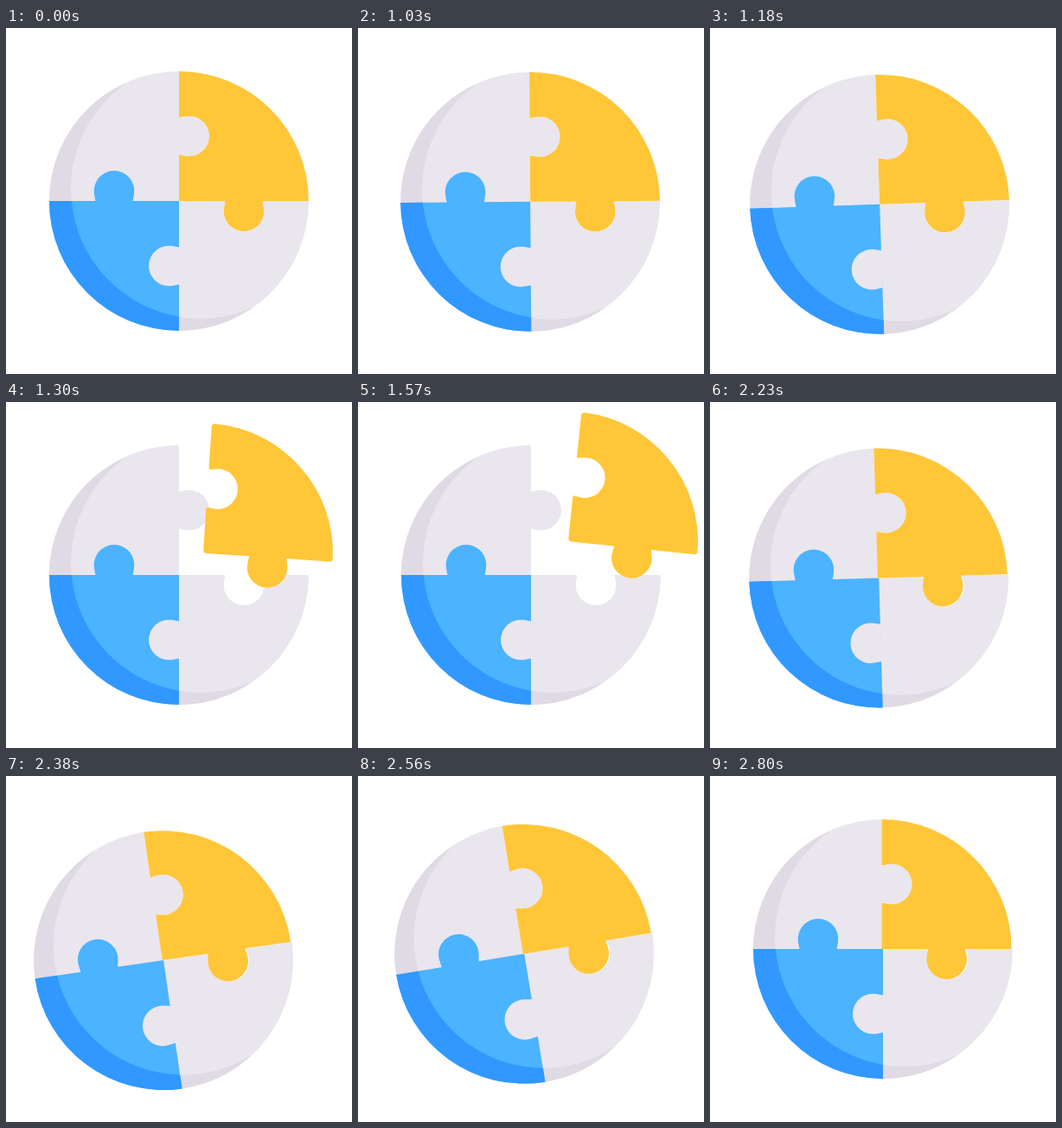
Recreate the animation shown at these times as an HTML page. Size 400 by 400 pixels, loop 2830 ms.

```html
<!DOCTYPE html>
<html lang="en">
<head>
<meta charset="utf-8">
<title>Puzzle circle</title>
<style>
  html, body { margin: 0; width: 100%; height: 100%; overflow: hidden; background: #fff; }
  svg { display: block; width: 100vw; height: 100vh; }
  .light { fill: #eae6ed; }
  .shade { fill: #e0dae4; }
  .blue { fill: #4bb3ff; }
  .deep { fill: #3098ff; }
  .gold { fill: #ffc638; }
  .hole { fill: #fff; }
</style>
</head>
<body>
<svg viewBox="0 0 400 400">
  <defs>
    <!-- Tab on the vertical seam, pointing right; rotated for the other seams -->
    <path id="tab" d="M199.5 103.4H200L207.7 102.05A23.3 23.3 0 1 1 207.7 147.95L200 146.6H199.5Z"/>
  </defs>
  <g id="disc">
    <path id="body" class="light"/>
    <path class="shade" d="M139.7 63A150 150 0 0 0 50 200H75.7A150 150 0 0 1 139.7 63Z"/>
    <path class="shade" d="M200 350A150 150 0 0 0 285.4 323A150 150 0 0 1 200 333.9Z"/>
    <use href="#tab" class="light"/>
    <use href="#tab" class="hole" transform="rotate(90 200 200)"/>
    <path class="blue" d="M200 200V350A150 150 0 0 1 50 200Z"/>
    <path class="deep" d="M50 200A150 150 0 0 0 200 350V333.9A150 150 0 0 1 75.7 200Z"/>
    <use href="#tab" class="blue" transform="rotate(270 200 200)"/>
    <use href="#tab" class="light" transform="rotate(180 200 200)"/>
    <path id="piece" class="gold"/>
  </g>
</svg>
<script>
const LOOP = 2830, START = 1030, STEP = 30;
const RELEASE = 1195, PEAK = 1570, IMPACT = 2203;
const disc = document.getElementById('disc');
const body = document.getElementById('body');
const piece = document.getElementById('piece');

// r rounds the outer corners; the lips of the socket get half of it
function piecePath(r) {
  const l = r / 2;
  return `M${200 + r} 200Q200 200 200 ${200 - r}V${146.6 + l}
    Q200 146.6 ${200 + l} ${146.6 + l * 0.175}L207.7 147.95
    A23.3 23.3 0 1 0 207.7 102.05L${200 + l} ${103.4 - l * 0.175}
    Q200 103.4 200 ${103.4 - l}V${50 + r}Q200 50 ${200 + r} 50.05
    A150 150 0 0 1 349.95 ${200 - r}Q350 200 ${350 - r} 200
    H296.6L297.95 207.7A23.3 23.3 0 1 1 252.05 207.7L253.4 200Z`;
}

// Three quarters of the disc, tucked slightly under the blue quarter
function bodyPath(r) {
  return `M200 200V${50 + r}Q200 50 ${200 - r} 50.03
    A150 150 0 0 0 50 200l2 2H198V348L200 350
    A150 150 0 0 0 349.97 ${200 + r}Q350 200 ${350 - r} 200Z`;
}

const shapes = {
  joined: [bodyPath(0), piecePath(0)],
  apart: [bodyPath(2.5), piecePath(4)]
};

const part = (t, a, b) => Math.min(1, Math.max(0, (t - a) / (b - a)));
const wave = u => (1 - Math.cos(Math.PI * u)) / 2;
const easeOut = u => 1 - (1 - u) ** 2;

function pose(t) {
  const windUp = wave(part(t, 1008, 1125)) * (1 - part(t, 1125, RELEASE) ** 2);
  const push = easeOut(part(t, IMPACT, 2393)) * (1 - wave(part(t, 2393, 2700)));
  const twist = easeOut(part(t, IMPACT, 2510)) * (1 - wave(part(t, 2510, 2800)));
  const out = t < PEAK
    ? 1 - (1 - part(t, RELEASE, PEAK)) ** 3.2
    : 1 - part(t, PEAK, IMPACT) ** 2.81;
  return {
    x: -10 * windUp - 18 * push,
    y: 10 * windUp + 13 * push,
    turn: -5 * windUp - 10 * twist,
    out,
    slip: t > IMPACT ? -1.3 : 0
  };
}

function draw(now) {
  let t = now % LOOP;
  t = t < START ? 0 : START + Math.floor((t - START) / STEP) * STEP;
  const p = pose(t);
  const [bodyShape, pieceShape] = p.out > 0 ? shapes.apart : shapes.joined;
  body.setAttribute('d', bodyShape);
  piece.setAttribute('d', pieceShape);
  disc.setAttribute('transform', `translate(${p.x} ${p.y}) rotate(${p.turn} 200 200)`);
  piece.setAttribute('transform',
    `translate(${43 * p.out + p.slip} ${-39 * p.out}) rotate(${5.9 * p.out} 200 200)`);
}

const began = performance.now();
function tick() {
  draw(performance.now() - began);
  requestAnimationFrame(tick);
}
tick();
</script>
</body>
</html>
```
